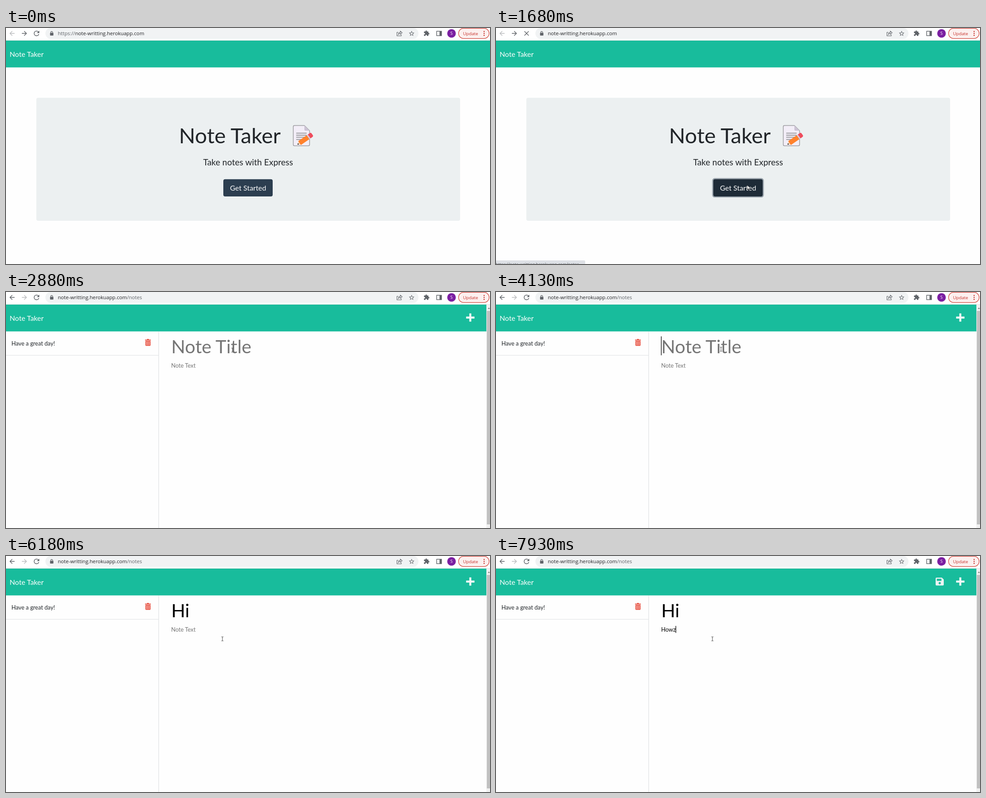
Recreate the animation shown at these times as an HTML page. Size 1069 by 524 pixels, loop 8 s.

```html
<!DOCTYPE html>
<html lang="en">
<head>
<meta charset="utf-8">
<title>Note Taker</title>
<style>
  html, body { margin: 0; width: 100%; height: 100%; overflow: hidden; background: #fefefe; }
  svg { display: block; width: 1069px; height: 524px; }
  text { font-family: Lato, sans-serif; fill: #212529; }
  .ui, .ui text { font-family: "Open Sans", "Noto Sans", sans-serif; }
  .url { font-size: 11.2px; fill: #202124; }
  .dim { fill: #5f6368; }
  .icon { fill: #5f6368; }
  .line { fill: none; stroke: #5f6368; stroke-width: 1.4; }
  .brand { font-size: 15.8px; fill: #fff; }
  .title { font-size: 40.5px; }
  .body { font-size: 12.65px; }
  .hint { fill: #757575; }
  .typed { fill: #000; }
</style>
</head>
<body>
<svg viewBox="0 0 1069 524">
  <defs>
    <path id="back" d="M20 11H7.83l5.59-5.59L12 4l-8 8 8 8 1.41-1.41L7.83 13H20z"/>
  </defs>

  <rect width="1069" height="524" fill="#fefefe"/>

  <!-- page -->
  <rect y="28" width="1069" height="59.5" fill="#18bc9c"/>
  <text class="brand" x="8" y="64">Note Taker</text>

  <g id="home">
    <rect x="67" y="155" width="936" height="273" rx="4" fill="#ecf0f1"/>
    <text x="382" y="256" font-size="47.2">Note Taker</text>
    <g stroke-linejoin="round">
      <path d="M637 216.500H659L670.500 228V259a2.500 2.500 0 0 1-2.500 2.500H637a2.500 2.500 0 0 1-2.500-2.500V219a2.500 2.500 0 0 1 2.500-2.500z" fill="#f3eef8" stroke="#9b9b9f" stroke-width="1.500"/>
      <path d="M659 216.500V225.500q0 2.500 2.500 2.500H670.500z" fill="#cdc4d6"/>
      <path d="M641 233.500H664M641 238H664M641 242.500H660M641 247.500H655" stroke="#9b9b9f" stroke-width="1.800"/>
      <g transform="translate(643.500 259) rotate(-35)">
        <path d="M0 0L8-5V5z" fill="#f8d3b0"/>
        <path d="M0 0L3.200-2V2z" fill="#333"/>
        <path d="M6-5.200H29V5.200H6z" fill="#ff822d"/>
        <path d="M29-5.200H33V5.200H29z" fill="#d9c8d6"/>
        <path d="M32-5.200H37a3 3 0 0 1 3 3V2.200a3 3 0 0 1-3 3H32z" fill="#ee4c5c"/>
      </g>
    </g>
    <text x="534.700" y="304.500" font-size="18.970" text-anchor="middle">Take notes with Express</text>
    <rect id="ring" x="477.500" y="333.300" width="114" height="43" rx="5.500" fill="#96a0a9"/>
    <rect id="button" x="480" y="335.700" width="109" height="38.300" rx="4"/>
    <text x="534.700" y="361" font-size="15.800" text-anchor="middle" style="fill:#fff">Get Started</text>
  </g>

  <g id="notes">
    <path d="M337.200 88V524" stroke="#dfe2e4" stroke-width="1.200"/>
    <g id="list">
      <text class="body" x="12" y="118.500">Have a great day!</text>
      <path d="M0 140.500H337" stroke="#dfe2e4"/>
      <g fill="#e74c3c">
        <path d="M307 105.800H311L312 104.300H315L316 105.800H320V107.600H307z"/>
        <path fill-rule="evenodd" d="M308 108.400H319.200V118a1.600 1.600 0 0 1-1.600 1.600H309.600a1.600 1.600 0 0 1-1.600-1.600zM310 110V118H311V110zM313 110V118H314V110zM316.200 110V118H317.200V110z"/>
      </g>
    </g>
    <text id="titleHint" class="title hint" x="365" y="135.500">Note Title</text>
    <text id="bodyHint" class="body hint" x="364.800" y="167.500">Note Text</text>
    <text id="title" class="title typed" x="365" y="135.500"></text>
    <text id="body" class="body typed" x="364.800" y="167.500"></text>
    <rect id="caret" width="1.300" fill="#000"/>
    <path d="M1025.500 47.500V65.800M1016.300 56.700H1034.700" stroke="#f4f8f8" stroke-width="4.400"/>
    <path id="save" fill="#ecf3f3" fill-rule="evenodd" d="M973 48H984.800L989 52.200V63.500a2 2 0 0 1-2 2H973a2 2 0 0 1-2-2V50a2 2 0 0 1 2-2zM973.600 50.400V55.300H983.800V50.400zM980 57.800a2.500 2.500 0 1 0 .01 0z"/>
    <rect x="1061" y="28" width="8" height="496" fill="#f1f1f1"/>
    <rect x="1062" y="42" width="7" height="474" fill="#c1c1c1"/>
    <path d="M1064 37.500L1066.500 34.500 1069 37.500z" fill="#7b7b7b"/>
  </g>

  <g id="status" class="ui">
    <path d="M0 516H194.500a2.500 2.500 0 0 1 2.500 2.500V524H0z" fill="#dee1e6"/>
    <text class="dim" x="-1" y="528.300" font-size="9.200">https://note-writting.herokuapp.com/notes</text>
  </g>

  <!-- browser bar -->
  <g class="ui">
    <rect width="1069" height="27" fill="#fff"/>
    <path d="M0 27.500H1069" stroke="#dfe3e3"/>
    <rect x="87" width="824" height="24" rx="12" fill="#f1f3f4"/>
    <use id="prev" href="#back" transform="translate(5 3.600) scale(.7)"/>
    <use id="next" href="#back" transform="translate(49 3.600) scale(-.7 .7)"/>
    <path id="reload" class="icon" transform="translate(58.500 3) scale(.75)" d="M17.650 6.350A7.960 7.960 0 0 0 12 4a8 8 0 1 0 7.730 10h-2.080A6 6 0 1 1 12 6c1.660 0 3.140.69 4.220 1.780L13 11h7V4z"/>
    <path id="stop" class="line" d="M62.800 7.300L72.200 16.700M72.200 7.300L62.800 16.700"/>
    <rect class="icon" x="97.300" y="10.800" width="7.400" height="6" rx=".8"/>
    <path class="line" style="stroke-width:1.200" d="M98.900 11V9.800a2.100 2.100 0 0 1 4.200 0V11"/>
    <text class="url" x="114.500" y="16"><tspan id="scheme" class="dim"></tspan><tspan>note-writting.herokuapp.com</tspan><tspan id="path" class="dim"></tspan></text>

    <path class="line" style="stroke-width:1.100" d="M866.500 9.500H863.500V17.500H873V14.500M866.500 14.500Q867 9.800 871 9.500V7L875 10.600 871 14V11.800Q868.500 11.800 866.500 14.500z"/>
    <path class="icon" transform="translate(888.700 5) scale(.6)" d="M22 9.240l-7.190-.62L12 2 9.190 8.630 2 9.240l5.460 4.730L5.820 21 12 17.270 18.180 21l-1.630-7.030zM12 15.400l-3.760 2.270 1-4.280-3.320-2.880 4.380-.38L12 6.100l1.710 4.040 4.380.38-3.320 2.880 1 4.280z"/>
    <path class="icon" transform="translate(922 4.800) scale(.58)" d="M20.500 11H19V7c0-1.100-.9-2-2-2h-4V3.500a2.500 2.500 0 0 0-5 0V5H4c-1.100 0-2 .9-2 2v3.800h1.500a2.700 2.700 0 0 1 0 5.400H2V20c0 1.100.9 2 2 2h3.800v-1.500a2.700 2.700 0 0 1 5.400 0V22H17c1.100 0 2-.9 2-2v-4h1.500a2.500 2.500 0 0 0 0-5z"/>
    <rect class="line" x="951.200" y="7.200" width="10.600" height="9.800"/>
    <rect class="icon" x="957.500" y="7" width="4.800" height="10.200"/>
    <circle cx="984" cy="12" r="9.500" fill="#7b1fa2"/>
    <text x="984" y="15.300" font-size="9" text-anchor="middle" style="fill:#fff">S</text>
    <rect x="999.500" y=".7" width="67.500" height="22.600" rx="11.300" fill="#fcf0ef" stroke="#d2453c" stroke-width="1.200"/>
    <text x="1009.500" y="15.500" font-size="9.700" style="fill:#c5302a">Update</text>
    <g fill="#c5302a"><circle cx="1056" cy="7.800" r="1.300"/><circle cx="1056" cy="12" r="1.300"/><circle cx="1056" cy="16.200" r="1.300"/></g>
  </g>

  <path id="arrow" d="M0 0V9.500L2.200 7.500 3.700 10.800 5.200 10.100 3.800 7H6.800z" fill="#fff" stroke="#222" stroke-width=".7"/>
  <path id="beam" d="M-2.200-4.500H-.6L0-4 .6-4.500H2.200M0-4V4M-2.200 4.500H-.6L0 4 .6 4.500H2.200" fill="none" stroke="#444" stroke-width="1"/>
</svg>

<script>
const LOOP = 8000;
const el = {};
document.querySelectorAll('[id]').forEach(node => { el[node.id] = node; });

const show = (node, on) => { node.style.display = on ? '' : 'none'; };
const place = (node, [x, y]) => node.setAttribute('transform', `translate(${x} ${y})`);
const within = (t, from, to) => t >= from && t < to;

// Value of the latest step that has begun.
function latest(steps, t) {
  let value = null;
  for (const [start, v] of steps) if (t >= start) value = v;
  return value;
}

// The pointer sweeps from the right edge of the card to the button.
const sweep = Array.from({ length: 12 }, (_, k) => {
  const p = (k + 1) / 12;
  const e = p * p * (3 - 2 * p);
  return [650 + k * 750 / 11, [824 - 269 * e, 351 - 2 * e - 20 * Math.sin(Math.PI * e)]];
});
const arrowPath = [[310, [899, 398]], [380, [864, 374]], [450, [824, 351]], ...sweep];

const beamPath = [
  [1810, [556, 349]], [2350, [548, 310]], [2420, [528, 230]], [2480, [508, 158]], [2550, [498, 131]],
  [2880, [500, 129]], [2960, [497, 127]],
  [5190, [494, 135.5]], [5250, [491, 146]], [5320, [486, 164]], [5390, [480, 179]], [5450, [478, 184]]
];
const titleSteps = [[0, ''], [4590, 'H'], [4720, 'Hi']];
const bodySteps = [[0, ''], [6580, 'H'], [6790, 'Ho'], [6920, 'How'], [7930, 'Howz']];
const caretSteps = [
  [3080, true], [3600, false], [4130, true], [5250, false],
  [5650, true], [6180, false], [6580, true], [7450, false], [7930, true]
];

function drawCaret(t) {
  const inBody = t >= 5650;
  const field = inBody ? el.body : el.title;
  const width = field.textContent ? field.getComputedTextLength() : 0;
  el.caret.setAttribute('x', 364.4 + width);
  el.caret.setAttribute('y', inBody ? 155.3 : 98.5);
  el.caret.setAttribute('height', inBody ? 15.4 : 42);
  show(el.caret, latest(caretSteps, t));
}

function render(t) {
  const onNotes = t >= 1810;
  const pressed = t >= 1470;
  const loading = within(t, 1540, 2080);
  const arrowAt = latest(arrowPath, t);
  const beamAt = latest(beamPath, t);
  const hover = t >= 650 && arrowAt[0] < 589 && arrowAt[1] > 335;

  show(el.home, !onNotes);
  show(el.notes, onNotes);
  show(el.ring, pressed);
  el.button.setAttribute('fill', hover ? '#1e2b37' : '#2c3e50');
  show(el.status, hover && t < 2150);
  show(el.list, t >= 2010);
  show(el.save, t >= 6580);

  el.scheme.textContent = pressed ? '' : 'https://';
  el.path.textContent = onNotes ? '/notes' : '';
  el.prev.setAttribute('fill', onNotes ? '#5f6368' : '#babcbe');
  el.next.setAttribute('fill', onNotes ? '#babcbe' : '#5f6368');
  show(el.reload, !loading);
  show(el.stop, loading);

  el.title.textContent = latest(titleSteps, t);
  el.body.textContent = latest(bodySteps, t);
  show(el.titleHint, t < 4590);
  show(el.bodyHint, t < 6580);
  drawCaret(t);

  show(el.arrow, arrowAt && !onNotes);
  if (arrowAt) place(el.arrow, arrowAt);
  // Typing the title hides the pointer until it moves again.
  show(el.beam, beamAt && !within(t, 4590, 5190));
  if (beamAt) place(el.beam, beamAt);
}

const begin = performance.now();
function tick() {
  render((performance.now() - begin) % LOOP);
  requestAnimationFrame(tick);
}
tick();
</script>
</body>
</html>
```
